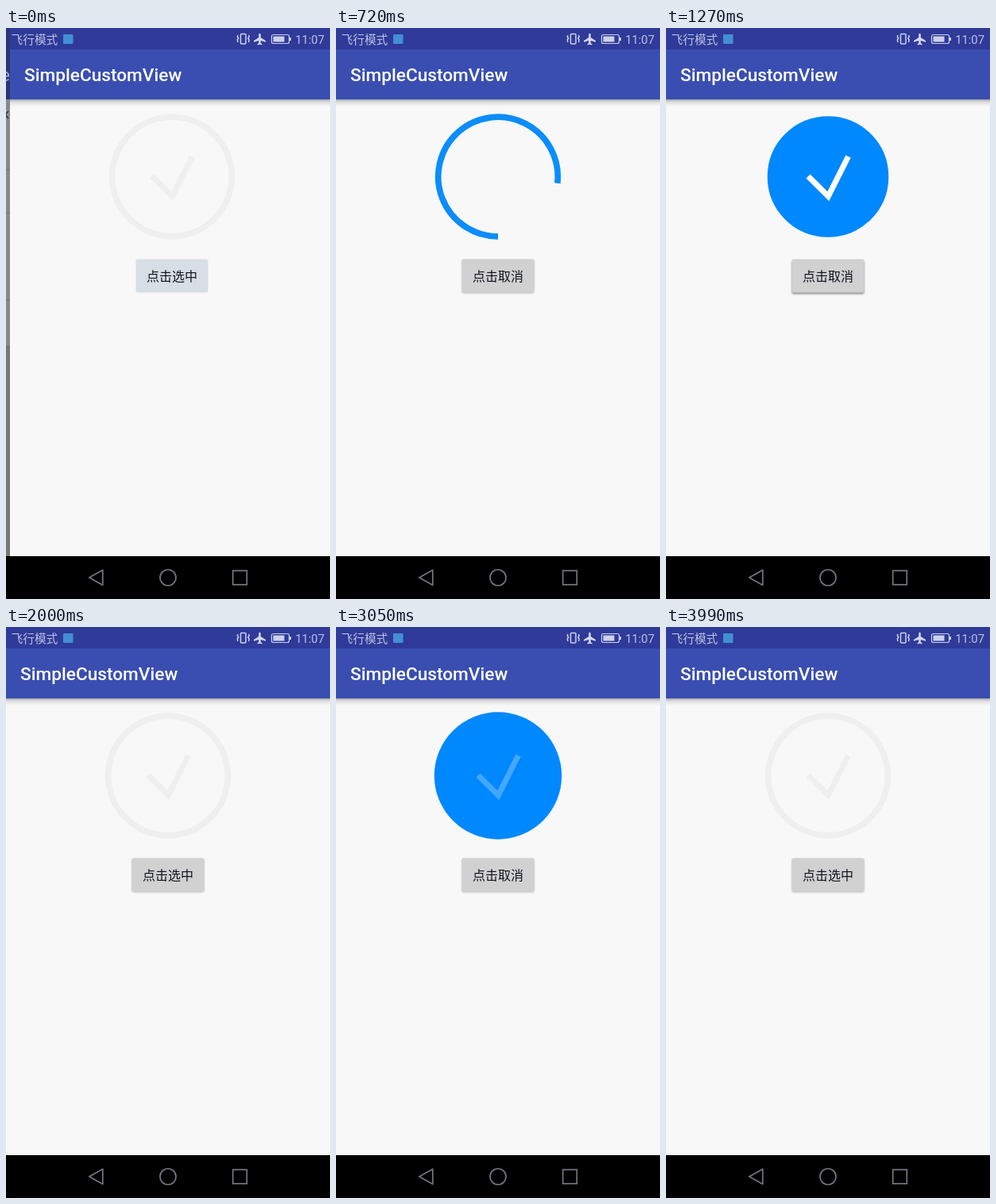
An HTML page that plays this animation: 408x720 px, repeating every 4050 ms.

```html
<!DOCTYPE html>
<html lang="zh-CN">
<head>
<meta charset="utf-8">
<title>SimpleCustomView</title>
<style>
  html, body { margin: 0; width: 100%; height: 100%; overflow: hidden; background: #000; }
  svg { display: block; width: 408px; height: 720px; }
  text { font-family: Roboto, "Noto Sans CJK SC", "Noto Sans CJK", sans-serif; }
</style>
</head>
<body>
<svg viewBox="0 0 408 720">
  <defs>
    <linearGradient id="barShadow" x2="0" y2="1">
      <stop offset="0" stop-opacity=".32"/>
      <stop offset=".4" stop-opacity=".1"/>
      <stop offset="1" stop-opacity="0"/>
    </linearGradient>
    <filter id="blur" x="-20%" y="-20%" width="140%" height="150%">
      <feGaussianBlur stdDeviation="1.2"/>
    </filter>
  </defs>

  <!-- Dimmed previous screen, visible only beside the incoming page -->
  <g id="previous">
    <rect width="12" height="90" fill="#2b3674"/>
    <rect y="90" width="12" height="310" fill="#898989"/>
    <rect y="400" width="12" height="266" fill="#787878"/>
    <path d="M0 178.500h12M0 233.500h12M0 343.500h12" stroke="#777"/>
    <text x="-7" y="67" font-size="22.700" fill="#9da4c9">e</text>
    <path d="M3 105l-4 4 4 5" fill="none" stroke="#263150" stroke-width="1.500"/>
  </g>

  <g id="page">
    <rect width="408" height="666" fill="#f8f8f8"/>
    <rect y="90" width="408" height="9" fill="url(#barShadow)"/>
    <rect width="408" height="90" fill="#3a4eb1"/>
    <rect width="408" height="27" fill="#2f3a99"/>
    <text x="18" y="67" font-size="22.670" font-weight="500" fill="#fff">SimpleCustomView</text>

    <circle id="disc" cx="204" cy="187.500" r="75.300" fill="#0088ff"/>
    <circle id="hole" cx="204" cy="187.500" fill="#fff"/>
    <path id="ring" fill="none"/>
    <path id="tick" d="M179 187L204.300 212.300L229.500 162" fill="none" stroke-width="7.200" stroke-miterlimit="8"/>

    <rect id="buttonShadow" x="158.500" y="292.500" width="91" height="42" rx="2" filter="url(#blur)"/>
    <rect id="button" x="158.500" y="291.500" width="91" height="42" rx="2"/>
    <text id="label" x="204" y="318.500" font-size="16" font-weight="500" text-anchor="middle" fill="#11131f"></text>
  </g>

  <!-- Status bar -->
  <g fill="#bcc2e3">
    <text x="6.500" y="19.500" font-size="14.700">飞行模式</text>
    <text x="401" y="19.500" font-size="14.800" text-anchor="end">11:07</text>
    <rect x="72" y="8" width="12.500" height="12" rx="1" fill="#438fd4"/>
    <g fill="none" stroke="#cbd0eb" stroke-width="1.500">
      <rect x="295.500" y="7.500" width="6.500" height="12.500" rx="1"/>
      <path d="M292 9l-.7 2 1.400 2-1.400 2 .7 3M305.500 9l.7 2-1.400 2 1.400 2-.7 3"/>
      <rect x="334.500" y="8.500" width="22" height="11" rx="2" stroke-width="1.200"/>
    </g>
    <path d="M318.200 8q1.300-2.500 2.600 0v4l6.200 4v1.700l-6.200-1.700v3l1.700 1.300v1.200l-3-.8-3 .8v-1.200l1.700-1.300v-3l-6.200 1.700V16l6.200-4z" fill="#d3d7ef"/>
    <path d="M336.500 10.500h14v7h-14zM357 12h2v4h-2z" fill="#cdd1ea"/>
  </g>

  <!-- Navigation bar -->
  <rect y="666" width="408" height="54"/>
  <g fill="none" stroke="#747780" stroke-width="1.700">
    <path d="M104.800 693L121.800 683.500V702.500Z" stroke-linejoin="round"/>
    <circle cx="204" cy="693" r="10"/>
    <rect x="285.700" y="684.300" width="17.600" height="17.600"/>
  </g>
</svg>
<script>
const LOOP = 4050, RATE = 18 / 1000;
const CENTER = { x: 204, y: 187.5 }, RADIUS = 75.3, STROKE = 7.7;
const RING_TIME = 300, FILL_TIME = 180, PULSE_TIME = 270, PULSE_STROKE = 14;
const CHECKS = [{ on: 492, off: 1240 }, { on: 2528, off: 3480 }];
const PRESSES = [[400, 500], [1150, 1240], [2330, 2528], [3370, 3480]];
const BLUE = '#0b8dfb', GREY = '#efefef';

const part = id => document.getElementById(id);
const set = (id, attrs) => {
  for (const name in attrs) part(id).setAttribute(name, attrs[name]);
};
const clamp = v => Math.min(1, Math.max(0, v));
const mix = (a, b, p) => a + (b - a) * p;

// Clockwise arc that begins at the bottom of the circle
function arc(sweep) {
  if (sweep <= 0) return '';
  const point = degrees => {
    const a = (90 + degrees) * Math.PI / 180;
    return `${CENTER.x + RADIUS * Math.cos(a)} ${CENTER.y + RADIUS * Math.sin(a)}`;
  };
  const half = sweep / 2, size = `A${RADIUS} ${RADIUS} 0 0 1 `;
  return `M${point(0)}${size}${point(half)}${size}${point(sweep)}`;
}

function drawMark(elapsed) {
  const checked = elapsed !== null;
  const fill = checked ? clamp((elapsed - RING_TIME) / FILL_TIME) : 0;
  const pulse = checked ? clamp((elapsed - RING_TIME - FILL_TIME) / PULSE_TIME) : 0;
  const width = pulse < .5
    ? mix(STROKE, PULSE_STROKE, pulse * 2)
    : mix(PULSE_STROKE, 0, pulse * 2 - 1);
  const filling = checked && elapsed >= RING_TIME;

  set('ring', {
    d: arc(checked ? 360 * clamp(elapsed / RING_TIME) : 360),
    stroke: filling ? '#0088ff' : checked ? BLUE : GREY,
    'stroke-width': width
  });
  set('disc', { opacity: filling ? 1 : 0 });
  set('hole', { r: filling ? RADIUS * (1 - fill) : 0 });
  set('tick', {
    stroke: checked ? '#fff' : GREY,
    opacity: checked ? clamp(pulse * 1.5) : 1
  });
}

function draw(t) {
  const offset = 5 * (1 - clamp(t / 170)) ** 2;
  set('page', { transform: `translate(${offset} 0)` });

  const check = CHECKS.find(c => t >= c.on && t < c.off);
  drawMark(check ? t - check.on : null);

  const entering = t < 50;
  const pressed = PRESSES.some(([from, to]) => t >= from && t < to);
  part('label').textContent = check ? '点击取消' : '点击选中';
  set('button', { fill: entering ? '#d7dee5' : '#d1d1d1' });
  set('buttonShadow', {
    opacity: entering ? 0 : pressed ? .4 : .25,
    transform: `translate(0 ${pressed ? 1 : 0})`
  });
}

function frame(now) {
  const t = now % LOOP;
  draw(Math.floor((t + 5) * RATE) / RATE);
  requestAnimationFrame(frame);
}
draw(0);
requestAnimationFrame(frame);
</script>
</body>
</html>
```
